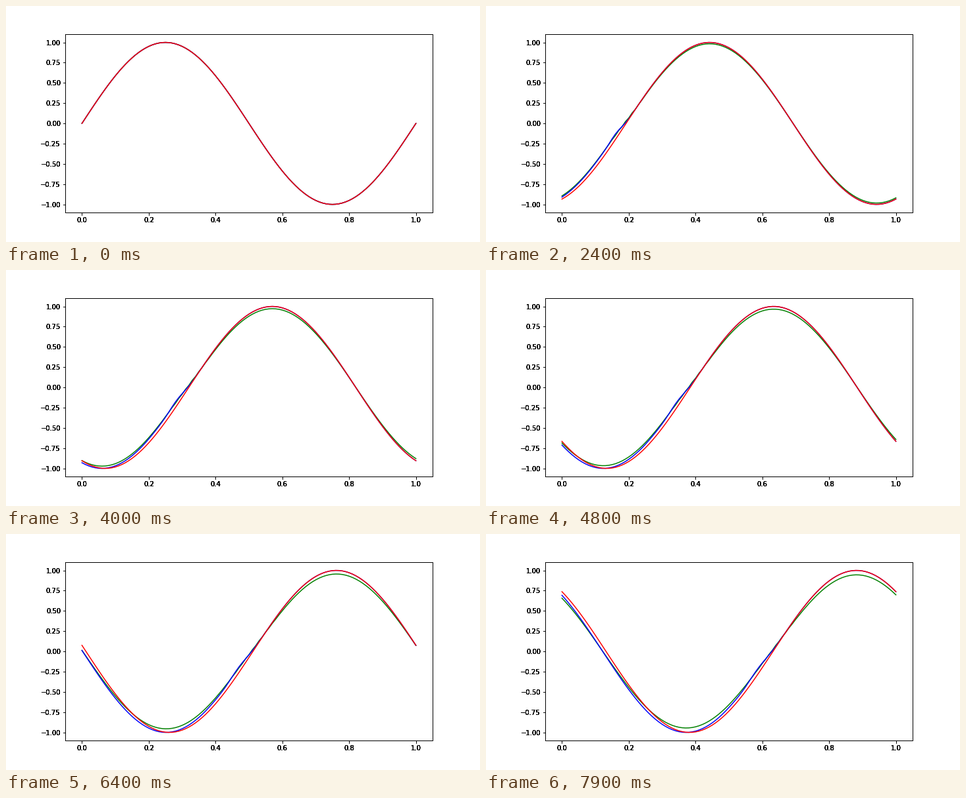
Animation, 720 px wide and 360 px high, one loop 8000 ms. Source, as a matplotlib script:

```python
import numpy as np
import matplotlib.pyplot as plt
from matplotlib.animation import FuncAnimation

FRAMES, INTERVAL = 80, 100
CELLS = 100
DX = 1 / CELLS
DT = 0.008
C = DT / DX  # Courant number
OVERDRAW = 5  # repeated axes darken the label edges

plt.rcParams.update({
    "font.family": "DejaVu Sans",
    "font.size": 10,
    "lines.linewidth": 1.5,
})

x = np.linspace(0, 1, CELLS + 1)


def wave(t):
    return np.sin(2 * np.pi * (x - t))


def neighbours(u):
    return np.roll(u, 1), np.roll(u, -1)


def lax_friedrichs(u):
    left, right = neighbours(u)
    return (left + right) / 2 - C / 2 * (right - left)


def lax_wendroff(u):
    left, right = neighbours(u)
    return u - C / 2 * (right - left) + C**2 / 2 * (right - 2 * u + left)


def solve(step):
    states = [wave(0)]
    for _ in range(FRAMES - 1):
        states.append(step(states[-1]))
    return states


runs = [
    solve(lax_friedrichs),
    solve(lax_wendroff),
    [wave(n * DT) for n in range(FRAMES)],
]

fig = plt.figure(figsize=(10, 5), dpi=72, facecolor="white")
for _ in range(OVERDRAW):
    ax = fig.add_axes([0.125, 0.125, 0.775, 0.755], facecolor="none")
    ax.set(xlim=(-0.05, 1.05), ylim=(-1.1, 1.1))
    ax.set_xticks(np.linspace(0, 1, 6))
    ax.set_yticks(np.linspace(-1, 1, 9))

lines = [ax.plot(x, run[0], color)[0] for run, color in zip(runs, "gbr")]


def update(n):
    for line, run in zip(lines, runs):
        line.set_ydata(run[n])
    return lines


anim = FuncAnimation(fig, update, frames=FRAMES, interval=INTERVAL,
                     repeat=True, repeat_delay=0, blit=False)
plt.show()
```
